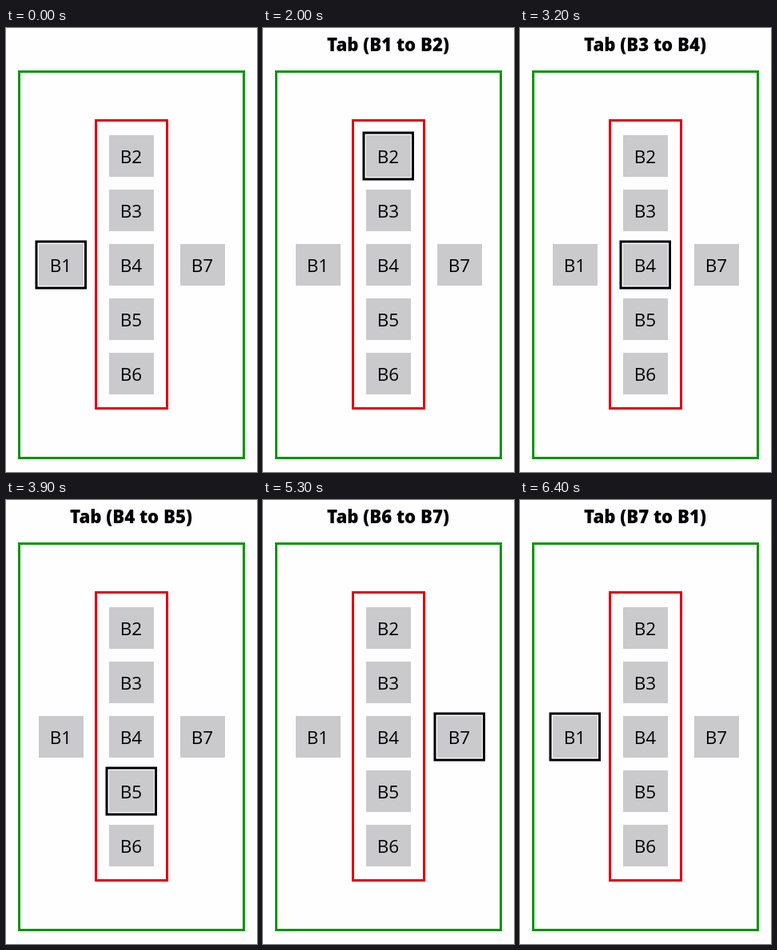
Recreate the animation shown at these times as an HTML page. Size 314 px wide and 555 px high, loop 8400 ms.

```html
<!DOCTYPE html>
<html lang="en">
<head>
<meta charset="utf-8">
<title>Tab order</title>
<style>
  html, body { margin: 0; width: 100%; height: 100%; overflow: hidden; background: #fefdff; }
  svg { display: block; width: 100vw; height: 100vh; }
  text { text-anchor: middle; fill: #000; }
  .label { font: 400 22.5px "Open Sans", "Noto Sans", sans-serif; }
  .title { font: 800 22.2px "Open Sans", "Noto Sans", sans-serif; }
</style>
</head>
<body>
<svg id="stage" viewBox="0 0 314 555">
  <g fill="none" stroke-width="3">
    <rect x="16.5" y="54.5" width="281" height="483" stroke="#0d950d"/>
    <rect x="112.5" y="115.5" width="89" height="360" stroke="#e1000f"/>
  </g>
  <g id="buttons"></g>
  <rect id="focus" width="61.5" height="58" fill="none" stroke="#000" stroke-width="3"/>
  <text id="title" class="title" x="156.5" y="29"></text>
</svg>
<script>
const LOOP = 8400, FIRST = 1800, STEP = 700;
const W = 56, H = 52;
const column = [0, 1, 2, 3, 4].map(i => [129, 134 + 68 * i]);
const spots = [[41, 270], ...column, [218, 270]];
const count = spots.length;

const byId = id => document.getElementById(id);
const buttons = byId("buttons"), focusRing = byId("focus"), title = byId("title");

function add(tag, attrs, text = "") {
  const el = document.createElementNS(buttons.namespaceURI, tag);
  for (const key in attrs) el.setAttribute(key, attrs[key]);
  el.textContent = text;
  buttons.append(el);
}

spots.forEach(([x, y], i) => {
  add("rect", { x, y, width: W, height: H, fill: "#cac9cb" });
  add("text", { x: x + W / 2 - 0.5, y: y + 35, class: "label" }, `B${i + 1}`);
});

function draw(t) {
  // Number of Tab presses so far; the last one wraps back to B1.
  const presses = t < FIRST ? 0 : Math.min(count, Math.floor((t - FIRST) / STEP) + 1);
  const current = presses % count;
  const [x, y] = spots[current];
  focusRing.setAttribute("x", x - 3);
  focusRing.setAttribute("y", y - 3);
  title.textContent = presses ? `Tab (B${presses} to B${current + 1})` : "";
}

const start = performance.now();
function tick() {
  draw((performance.now() - start) % LOOP);
  requestAnimationFrame(tick);
}
tick();
</script>
</body>
</html>
```
